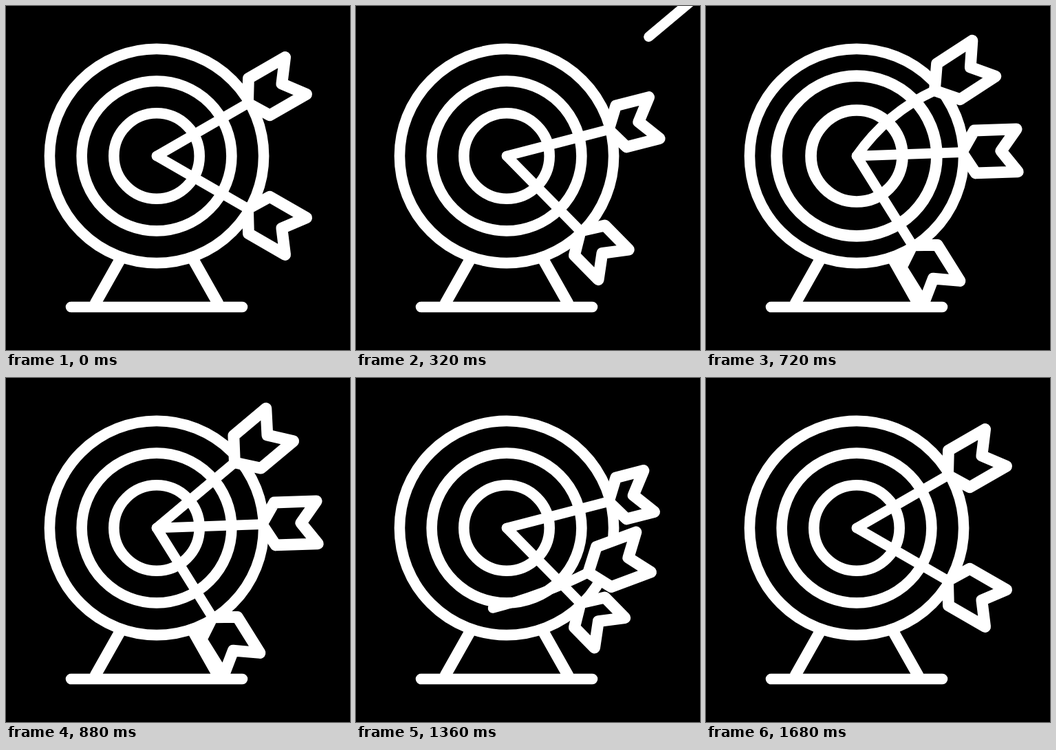
Animation of 500 by 500 pixels, one loop 2000 ms. Source, as an HTML page:

```html
<!DOCTYPE html>
<html lang="en">
<head>
<meta charset="utf-8">
<title>Target and arrows</title>
<style>
  html, body { margin: 0; width: 100%; height: 100%; overflow: hidden; background: #000; }
  svg { display: block; width: 100%; height: 100%; }
  svg * { stroke: #fff; stroke-width: 15.6; stroke-linecap: round; stroke-linejoin: round; fill: none; }
  .legs { stroke-width: 16.6; }
  .arrow .shaft { stroke-width: 14.6; }
  .arrow .fletch { stroke-width: 16.8; fill: #000; }
</style>
</head>
<body>
<svg viewBox="0 0 500 500">
  <path class="legs" d="M165 370 130 432M273 370 308 432"/>
  <path d="M94.5 437.5H343.5"/>
  <g transform="translate(219 218)">
    <circle r="155.6"/>
    <g id="rings"><circle r="108.9"/><circle r="62.2"/></g>
    <g class="arrow"><path class="shaft"/><path class="fletch"/></g>
    <g class="arrow"><path class="shaft"/><path class="fletch"/></g>
    <g class="arrow"><path class="shaft"/><path class="fletch"/></g>
  </g>
</svg>
<script>
// Times are counted in steps of the 25 fps clock.
const LOOP = 2000, STEP = 40;
const SWING_IN = 0.5, IMPACT = 15, SWING_OUT = 27.5, END = 42;
const MIDDLE = 117, FLIGHT_ANGLE = -40, FLIGHT_SPEED = 38.5;

const rings = document.getElementById('rings');
const [upper, lower, flying] = document.querySelectorAll('.arrow');

// Eased interpolation through [step, value] keys.
function track(keys, n) {
  if (n <= keys[0][0]) return keys[0][1];
  for (let i = 1; i < keys.length; i++) {
    const [a, from] = keys[i - 1], [b, to] = keys[i];
    if (n <= b) {
      const p = (n - a) / (b - a);
      return from + (to - from) * p * p * (3 - 2 * p);
    }
  }
  return keys[keys.length - 1][1];
}

// The arrow points at its local origin; its feathers lie on the positive x axis.
function pose(arrow, transform, { neck = 153, stretch = 0, bend = 0, turn = 0 }) {
  const [shaft, fletch] = arrow.children;
  const tail = 233.4 + stretch, notch = 210 + stretch;
  arrow.setAttribute('transform', transform);
  shaft.setAttribute('d', `M0 0Q${neck / 2} ${bend} ${neck} 0`);
  fletch.setAttribute('d', `M${neck} 0L172-31H${tail}L${notch} 0 ${tail} 31H172Z`);
  fletch.setAttribute('transform', `rotate(${turn} ${neck} 0)`);
}

function recoil(n) {
  return track([[0, 0], [2, 1], [5, -0.2], [7, 0]], n - IMPACT);
}

function poseFlying(n) {
  const visible = n > SWING_IN && n < END;
  flying.style.display = visible ? '' : 'none';
  if (!visible) return;

  const neck = 148;
  if (n < SWING_OUT) {
    const distance = FLIGHT_SPEED * Math.max(0, IMPACT - n);
    const hit = recoil(n);
    pose(flying, `rotate(${FLIGHT_ANGLE}) translate(${distance})`,
      { neck, bend: -29 * hit, turn: 10 * hit });
    return;
  }
  const m = n - SWING_OUT, drop = 3.57 * m * m;
  const rad = FLIGHT_ANGLE * Math.PI / 180;
  const x = MIDDLE * Math.cos(rad), y = MIDDLE * Math.sin(rad) + drop;
  pose(flying, `translate(${x} ${y}) rotate(${FLIGHT_ANGLE + 0.13 * drop}) translate(${-MIDDLE})`,
    { neck, bend: track([[0, 0], [6, 8]], m) });
}

function draw(n) {
  const leaving = n >= SWING_OUT;
  const m = n - (leaving ? SWING_OUT : SWING_IN);
  const swing = track([[0, 0], [14, 28]], m);
  const angle = leaving ? 28 - swing : swing;
  const stretch = track([[0, 0], [5.5, -23], [11, 14], [14, 0]], m);

  pose(upper, `rotate(${angle - 30})`, { stretch });
  pose(lower, `rotate(${angle + 30})`, { stretch });
  poseFlying(n);
  rings.setAttribute('transform', `scale(${1 + 0.1 * recoil(n)})`);
}

const start = performance.now();
function tick() {
  const time = (performance.now() - start) % LOOP;
  draw(Math.floor(time / STEP));
  requestAnimationFrame(tick);
}
tick();
</script>
</body>
</html>
```
